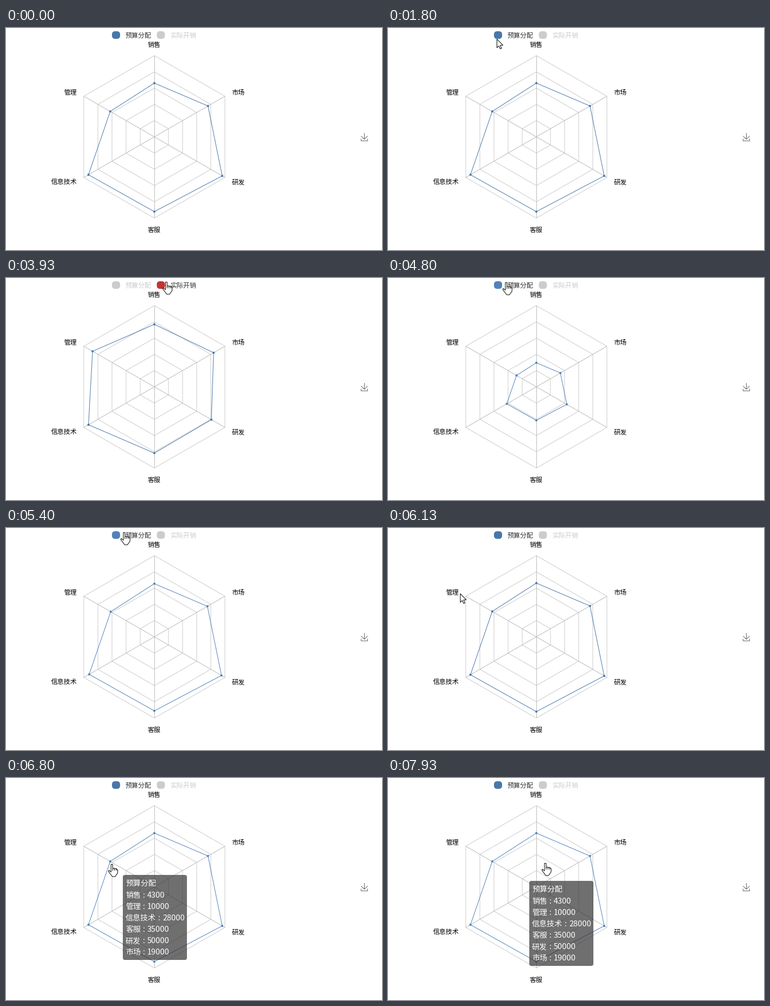
Recreate the animation shown at these times as a matplotlib script. Size 692 px wide and 410 px high, loop 8 s.

```python
import numpy as np
import matplotlib.pyplot as plt
from matplotlib.animation import FuncAnimation
from matplotlib.patches import Circle, FancyBboxPatch, Polygon

W, H, DPI = 692, 410, 64
PX = 72 / DPI  # points per pixel
FRAMES, INTERVAL = 200, 40
TICKS_PER_MS = 15 / 1000  # the screen itself refreshes 15 times a second

BLUE, BLUE_LIT, RED, OFF, INK = "#4977aa", "#5083bb", "#c23531", "#cccccc", "#333333"
NAMES = ["销售", "管理", "信息技术", "客服", "研发", "市场"]
LIMITS = np.array([6500, 16000, 30000, 38000, 52000, 25000])
BUDGET = np.array([4300, 10000, 28000, 35000, 50000, 19000])
ACTUAL = np.array([5000, 14000, 28000, 31000, 42000, 21000])
CENTER, RADIUS = np.array([273, 201]), 150
ANGLES = np.radians(90 + 60 * np.arange(6))
SPOKES = np.column_stack([np.cos(ANGLES), -np.sin(ANGLES)]).round(9)


def radar_points(values):
    return CENTER + SPOKES * (values / LIMITS * RADIUS)[:, None]


# Moments of the interaction, in ticks
HOVER, CLICK_ACTUAL, CLICK_BUDGET, LEAVE, ON_MARK, MOVE_OFF = 29, 43, 70, 85, 96, 114
GROW_TICKS = 15

# Pointer legs: start tick, length, goal, sideways bow
MARK = radar_points(BUDGET)[1] + (3, 4.5)
ENTRY = (62, 27)
LEGS = [(12, 2, (13, 298), 0), (15, 1, ENTRY, 0), (19, 3, (184, 12), 0),
        (24, 3, (200, 20), 0), (27, 7, (225, 12), 0), (37, 6, (295, 6.5), 0),
        (59, 7, (217.5, 7.5), 0), (83, 12, MARK, 96),
        (MOVE_OFF, 5, (289.5, 156.5), 0)]
TIP_LEGS = [(ON_MARK, 6, MARK + 20, 0), (MOVE_OFF, 5, (260, 190), 0)]

plt.rcParams["font.family"] = "Noto Sans CJK JP"
plt.rcParams["toolbar"] = "None"
fig = plt.figure(figsize=(W / DPI, H / DPI), dpi=DPI, facecolor="white")
ax = fig.add_axes([0, 0, 1, 1])
ax.set(xlim=(0, W), ylim=(H, 0))
ax.axis("off")


def label(x, y, text, size=12, color="black", ha="left", z=5):
    """Text whose middle line lies at y."""
    return ax.text(x, y + 0.38 * size, text, size=size * PX, color=color,
                   ha=ha, va="baseline", zorder=z)


def stroke(points, color, z=1):
    return ax.plot(*np.transpose(points), color=color, lw=PX, zorder=z, snap=False,
                   solid_capstyle="butt", solid_joinstyle="miter")[0]


def outline(points, face, edge, z):
    return ax.add_patch(Polygon(points, closed=True, fc=face, ec=edge, lw=PX,
                                joinstyle="round", zorder=z))


def rounded(x, y, w, h, r, color, z, alpha=1):
    return ax.add_patch(FancyBboxPatch(
        (x, y), w, h, boxstyle=f"round,pad=0,rounding_size={r}",
        fc=color, ec="none", alpha=alpha, zorder=z))


# Radar grid and axis names
for ring in range(1, 6):
    outline(CENTER + SPOKES * RADIUS * ring / 5, "none", "#cccccc", 1)
for name, spoke in zip(NAMES, SPOKES):
    side = np.sign(spoke[0])
    origin = CENTER + (0 if side else 0.5, 0)
    stroke([origin, origin + spoke * RADIUS], "#bbbbbb", z=2)
    x, y = CENTER + spoke * (RADIUS + (15 if side else 21))
    ha = {-1: "right", 0: "center", 1: "left"}[int(side)]
    label(x - 0.4 * side, y + 0.3, name, ha=ha)

# Legend
budget_icon, actual_icon = (rounded(x, 6, 15, 14, 6, OFF, 4) for x in (195, 277.5))
budget_text = label(220, 13, "预算分配")
actual_text = label(302, 13, "实际开销")

# Save button
for shape in ([(659.5, 194), (659.5, 205)],
              [(653.5, 199.5), (659.5, 205.5), (665.5, 199.5)],
              [(653.5, 204.5), (653.5, 208.5), (665.5, 208.5), (665.5, 204.5)]):
    stroke(shape, "#666666")

# Series
series = outline(radar_points(BUDGET), "none", BLUE, 6)
dots = [ax.add_patch(Circle(CENTER, 2, lw=0, zorder=7)) for _ in NAMES]

# Tooltip: each text keeps its offset from the panel corner
panel = rounded(0, 0, 118, 157, 4, "#323232", 8, alpha=0.7)
tip_texts = []


def tip_text(dx, row, text, size=14):
    artist = label(0, 0, text, size, "white", z=9)
    tip_texts.append((artist, dx, 21 * row + 21.3))


tip_text(5, 0, "预算分配")
for row, (name, value) in enumerate(zip(NAMES, BUDGET), 1):
    end = 5 + 14 * len(name)
    tip_text(5, row, name)
    tip_text(end + 4, row, ":")
    tip_text(end + 12, row, str(value), 14.6)

# Pointers, drawn around their hot spot
ARROW = np.array([(0.5, 0.5), (0.5, 16.5), (4, 13), (6.6, 18.6), (9, 17.6),
                  (6.6, 12), (11.5, 11.8)])
HAND = np.array([(-1.5, 1), (1.5, 1), (1.6, 8), (7.5, 8.8), (10.8, 11), (10.6, 17),
                 (6, 23.5), (1, 23.5), (-6.3, 14), (-5.5, 11.8), (-1.5, 15)])
KNUCKLES = np.array([(1.6 + 3.3 * k, y) for k in range(3) for y in (8, 12.5, np.nan)])
arrow = outline(ARROW, "white", "black", 12)
hand = outline(HAND, "white", "black", 12)
knuckles = stroke(KNUCKLES, "black", z=13)


def ease_out(u, power):
    return 1 - (1 - np.clip(u, 0, 1)) ** power


def travel(tick, start, legs, power=1):
    """Position after following the legs one after another."""
    spot = np.array(start, float)
    for begin, length, goal, bow in legs:
        u = ease_out((tick - begin) / length, power)
        spot = spot + (np.array(goal) - spot) * u - (bow * np.sin(np.pi * u), 0)
    return spot


def draw_series(tick, actual, lit):
    grown = 1
    if tick >= CLICK_ACTUAL:
        start = CLICK_ACTUAL + 0.35 if actual else CLICK_BUDGET - 0.7
        grown = ease_out((tick - start) / GROW_TICKS, 3)
    points = radar_points((ACTUAL if actual else BUDGET) * grown)
    color = BLUE_LIT if lit else BLUE
    series.set_xy(points)
    series.set_edgecolor(color)
    for dot, point in zip(dots, points):
        dot.center = point
        dot.set_facecolor(color)


def draw_legend(actual, lit):
    on_color = BLUE_LIT if lit else BLUE
    budget_icon.set_facecolor(OFF if actual else on_color)
    actual_icon.set_facecolor(RED if actual else OFF)
    budget_text.set_color(OFF if actual else INK)
    actual_text.set_color(INK if actual else OFF)


def draw_tooltip(tick):
    shown = tick >= ON_MARK
    x, y = np.round(travel(tick, (333, 127), TIP_LEGS, power=2))
    panel.set(visible=shown, x=x, y=y)
    for artist, dx, dy in tip_texts:
        artist.set(visible=shown, position=(x + dx, y + dy))


def draw_pointer(tick):
    shown = 12 <= tick <= 14 or tick >= 19
    pointing = HOVER <= tick < LEAVE or tick >= ON_MARK - 1
    spot = travel(tick, (155, 392), LEGS)
    arrow.set(visible=shown and not pointing, xy=ARROW + spot)
    hand.set(visible=shown and pointing, xy=HAND + spot)
    knuckles.set(visible=shown and pointing, data=(KNUCKLES + spot).T)


def update(frame):
    # a small lead keeps each tick from showing late on the frame grid
    tick = int((frame * INTERVAL + 14) * TICKS_PER_MS)
    actual = CLICK_ACTUAL <= tick < CLICK_BUDGET
    on_legend = CLICK_BUDGET <= tick < LEAVE
    draw_series(tick, actual, HOVER <= tick < 40 or on_legend or tick >= ON_MARK)
    draw_legend(actual, on_legend)
    draw_tooltip(tick)
    draw_pointer(tick)
    return []


anim = FuncAnimation(fig, update, frames=FRAMES, interval=INTERVAL,
                     init_func=lambda: update(0), repeat=True, repeat_delay=0)
plt.show()
```
